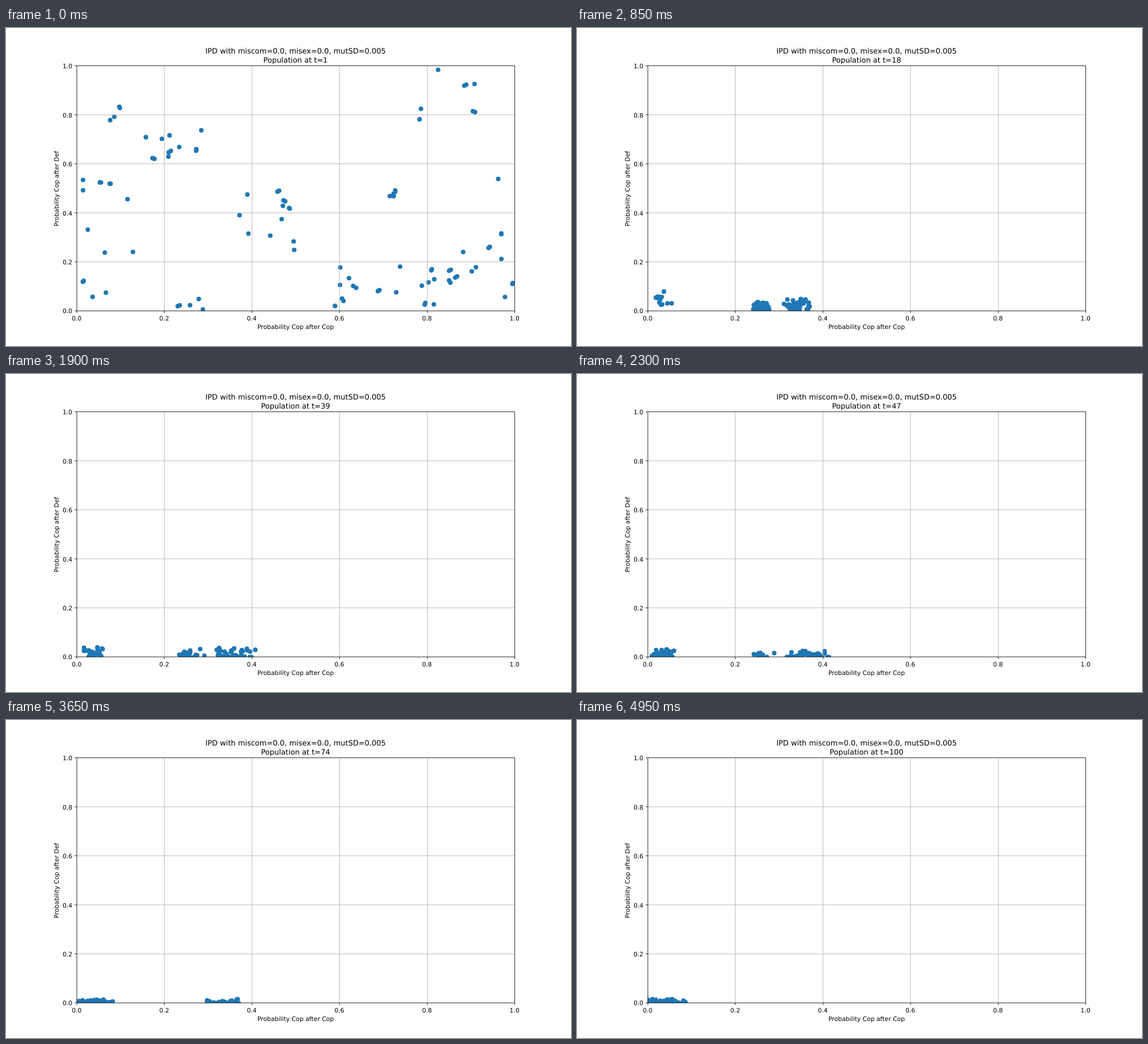
Write an HTML page that moves like this. It is 998 by 561 pixels and loops after 5050 ms.

```html
<!DOCTYPE html>
<html lang="en">
<head>
<meta charset="utf-8">
<title>Population scatter</title>
<style>
  html, body { margin: 0; width: 100%; height: 100%; overflow: hidden; background: #fff; }
  svg { display: block; width: 998px; height: 561px; }
  text { font: 13.89px "DejaVu Sans", sans-serif; text-anchor: middle; text-rendering: geometricPrecision; }
  .title { font-size: 16.67px; }
  .end { text-anchor: end; }
  #dots { fill: none; stroke: #1f77b4; stroke-width: 10.4; stroke-linecap: round; }
  #grid, #axes { fill: none; stroke: #b0b0b0; stroke-width: 1.11; }
  #axes { stroke: #000; }
</style>
</head>
<body>
<svg viewBox="0 0 1280 720" preserveAspectRatio="none">
  <clipPath id="area"><rect x="160" y="86.4" width="992" height="554.4"/></clipPath>
  <g clip-path="url(#area)"><path id="dots"/></g>
  <path id="grid"/>
  <path id="axes"/>
  <g id="labels"></g>
  <text class="title" x="656" y="57.8">IPD with miscom=0.0, misex=0.0, mutSD=0.005</text>
  <text class="title" x="656" y="78.1" id="caption"></text>
  <text x="656" y="681.5">Probability Cop after Cop</text>
  <text transform="translate(118.7 363.6) rotate(-90)">Probability Cop after Def</text>
</svg>
<script>
const $ = id => document.getElementById(id);
const STEP = 50, LOOP = 5050, LAST = 100, SIZE = 100, MUTATION = .005;
const LEFT = 160, BASE = 640.8, WIDTH = 992, HEIGHT = 554.4;

const px = x => LEFT + WIDTH * x;
const py = y => BASE - HEIGHT * y;
const clamp = v => Math.min(1, Math.max(0, v));
const dot = (x, y) => `M${px(clamp(x)).toFixed(2)} ${py(clamp(y)).toFixed(2)}h.01`;

// Smooth step from 0 at time a to 1 at time b
const ramp = (t, a, b) => {
  const u = clamp((t - a) / (b - a));
  return u * u * (3 - 2 * u);
};
// Repeatable noise in -1..1
const rnd = (a, b) => {
  const v = Math.sin(a * 127.1 + b * 311.7) * 43758.5453;
  return (v - Math.floor(v)) * 2 - 1;
};
// The same noise, wandering slowly over time
const drift = (id, t) => {
  const p = t / 8 + (rnd(id, 99) + 1) / 2, k = Math.floor(p);
  return rnd(id, k) + (rnd(id, k + 1) - rnd(id, k)) * (p - k);
};

// Starting clumps: centre, spread and number of founders; every fourth is a sibling
const founders = [];
for (const [x, y, rx, ry, n] of [
  [.72, .11, .15, .1, 26], [.28, .03, .05, .03, 5], [.07, .45, .06, .4, 18],
  [.22, .68, .07, .06, 12], [.44, .4, .07, .16, 14], [.72, .52, .01, .06, 5],
  [.85, .88, .07, .13, 8], [.94, .3, .06, .25, 12]
]) {
  for (let i = 0; i < n; i++) {
    const id = founders.length, near = founders[id - 1];
    founders.push(i % 4 === 3
      ? [near[0] + MUTATION * rnd(id, 1), near[1] + MUTATION * 2 * rnd(id, 2)]
      : [x + rx * rnd(id, 1), y + ry * rnd(id, 2)]);
  }
}

// The more generous a founder, the sooner it dies out
const alive = ([, y], i, t) => t === 1 || t < 2 + 7 * (1 - y) ** 2 + 1.5 * rnd(i, 7);

// Strains that take over: share of the dead, centre, spread and lift above zero
function strains(t) {
  const late = ramp(t, 60, 80), wide = ramp(t, 18, 47), sink = 1 - ramp(t, 10, 60);
  const second = .42 * (1 - ramp(t, 25, 57)), third = .46 * (1 - ramp(t, 66, 92));
  return [
    { share: 1 - second - third, x: .035, spread: .025 + .03 * late, lift: .055 * sink },
    { share: second, x: .26, spread: .022 + .016 * wide, lift: .014 * sink },
    { share: third, x: .342 + .018 * wide - .03 * late,
      spread: .036 + .022 * wide - .012 * late, lift: .025 * sink }
  ];
}

function population(t) {
  let d = "", left = 0;
  const walk = MUTATION * Math.sqrt(t - 1);
  founders.forEach((f, i) => {
    if (!alive(f, i, t)) return;
    left++;
    d += dot(f[0] + walk * rnd(i, t), f[1] + walk * rnd(i + .5, t));
  });
  const tall = .03 - .014 * ramp(t, 30, 65);
  strains(t).forEach(({ share, x, spread, lift }, s) => {
    const n = Math.round(share * (SIZE - left));
    for (let i = 0; i < n; i++) {
      const id = s * 500 + i * 2 + 200;
      d += dot(
        x + spread * drift(id, t) + MUTATION / 2 * rnd(id, t + 200),
        lift + tall * drift(id + 1, t) + MUTATION / 2 * rnd(id + 1, t + 200));
    }
  });
  return d;
}

function drawAxes() {
  // Lines sit on the pixel grid of the plot
  const snapX = v => Math.round(px(v)) + .5;
  const snapY = v => 719.5 - Math.round(720 - py(v));
  const x0 = snapX(0), x1 = snapX(1), y0 = snapY(0), y1 = snapY(1);
  let grid = "", axes = `M${x0} ${y0}H${x1}V${y1}H${x0}Z`, labels = "";
  for (let i = 0; i <= 5; i++) {
    const v = i / 5, x = snapX(v), y = snapY(v), name = v.toFixed(1);
    if (i % 5) grid += `M${x} ${y1}V${y0}M${x0} ${y}H${x1}`;
    axes += `M${x} ${y0}v4.9M${x0} ${y}h-4.9`;
    labels += `<text x="${px(v)}" y="662">${name}</text>
      <text class="end" x="150.3" y="${py(v) + 5.3}">${name}</text>`;
  }
  $("grid").setAttribute("d", grid);
  $("axes").setAttribute("d", axes);
  $("labels").innerHTML = labels;
}

let shown = 0;
const start = performance.now();
function draw() {
  const ms = (performance.now() - start) % LOOP;
  const t = Math.min(LAST, Math.floor(ms / STEP) + 1);
  if (t !== shown) {
    shown = t;
    $("dots").setAttribute("d", population(t));
    $("caption").textContent = "Population at t=" + t;
  }
  requestAnimationFrame(draw);
}
drawAxes();
draw();
</script>
</body>
</html>
```
